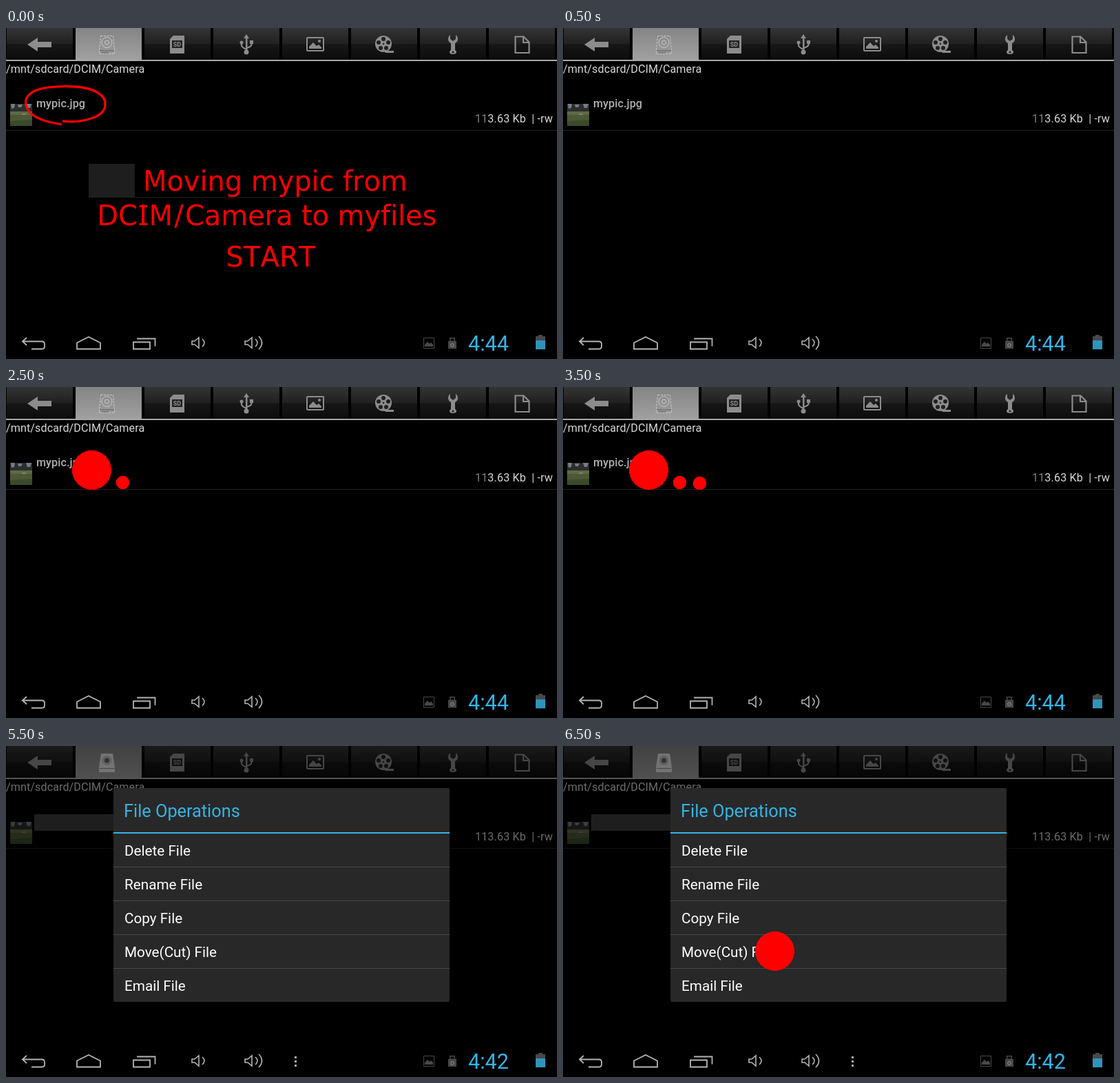
These frames come from a looping animation (800 by 480 pixels, 8000 ms). An HTML page:

```html
<!DOCTYPE html>
<html lang="en">
<head>
<meta charset="utf-8">
<title>Moving a file</title>
<style>
html, body { margin: 0; width: 100%; height: 100%; overflow: hidden; background: #000; }
svg { display: block; width: 800px; height: 480px; font-family: Roboto, sans-serif; }
text { white-space: pre; }

/* Hard cuts on one shared 8 s clock */
.cut { animation: 8s step-end infinite; }
.intro { animation-name: intro; }
.browse { animation-name: browse; }
.menu { animation-name: menu; }
.press { animation-name: press; }
.hold1 { animation-name: hold1; }
.hold2 { animation-name: hold2; }
.hold3 { animation-name: hold3; }
.pick { animation-name: pick; }
@keyframes intro { 0% { opacity: 1 } 6.25%, 100% { opacity: 0 } }
@keyframes browse { 0% { opacity: 1 } 68.75%, 100% { opacity: 0 } }
@keyframes menu { 0% { opacity: 0 } 68.75%, 100% { opacity: 1 } }
@keyframes press { 0% { opacity: 0 } 18.75%, 100% { opacity: 1 } }
@keyframes hold1 { 0% { opacity: 0 } 31.25%, 100% { opacity: 1 } }
@keyframes hold2 { 0% { opacity: 0 } 43.75%, 100% { opacity: 1 } }
@keyframes hold3 { 0% { opacity: 0 } 56.25%, 100% { opacity: 1 } }
@keyframes pick { 0% { opacity: 0 } 81.25%, 100% { opacity: 1 } }

.small { font-size: 16.1px; fill: #d8d8d8; letter-spacing: .1px; }
.caption { font: 40px "DejaVu Sans", Verdana, sans-serif; font-kerning: none; font-variant-ligatures: none; }
.red { fill: #f00; }
.touch { shape-rendering: crispEdges; }
.clock { font-size: 30.5px; fill: #33b5e5; }
.title { font-size: 25.3px; fill: #33b5e5; }
.item { font-size: 20.7px; fill: #fff; }
.line { fill: none; stroke: #b4b4b4; stroke-width: 1.8; }
</style>
</head>
<body>
<svg viewBox="0 0 800 480">
  <defs>
    <linearGradient id="tab" x2="0" y2="1">
      <stop offset="0" stop-color="#343434"/>
      <stop offset=".5" stop-color="#202020"/>
      <stop offset=".52" stop-color="#161616"/>
      <stop offset="1" stop-color="#0c0c0c"/>
    </linearGradient>
    <linearGradient id="active" x2="0" y2="1">
      <stop offset="0" stop-color="#848484"/>
      <stop offset="1" stop-color="#a0a0a0"/>
    </linearGradient>
    <path id="cell" d="M1 0h96v46h-96z"/>
  </defs>
  <rect width="800" height="480"/>

  <!-- Tab bar -->
  <g fill="url(#tab)">
    <use href="#cell"/>
    <use href="#cell" x="100" fill="url(#active)"/>
    <use href="#cell" x="200"/>
    <use href="#cell" x="300"/>
    <use href="#cell" x="400"/>
    <use href="#cell" x="500"/>
    <use href="#cell" x="600"/>
    <use href="#cell" x="700"/>
  </g>
  <path d="M0 46h800v2H0z" fill="#a8a8a8"/>
  <g fill="#8c8c8c">
    <path d="M31 24l15-10v6h20v8H46v6z"/>
    <path d="M243 11h16v26h-21V16z"/>
    <path d="M241 18h15v11h-15z" fill="#222"/>
    <text x="248.5" y="27" font-size="9" font-weight="700" text-anchor="middle">SD</text>
    <path d="M349 9l4 6h-8zM348 14h2.500v21H348z"/>
    <circle cx="349" cy="35" r="3.500"/>
    <circle cx="342" cy="21" r="2.500"/>
    <path d="M354 18h5v5h-5z"/>
    <path d="M342 21v4q0 3 7 6M356.500 21v3q0 3-7 5" fill="none" stroke="#8c8c8c" stroke-width="2.200"/>
    <rect x="437" y="14" width="24" height="19" rx="1" fill="none" stroke="#8c8c8c" stroke-width="2"/>
    <path d="M440 30v-3l6-6 5 5 3-2 4 4v2z"/>
    <circle cx="455" cy="19" r="2"/>
    <circle cx="548" cy="23" r="12"/>
    <path d="M549 33h14v3h-12z"/>
    <g fill="#202020">
      <circle cx="548" cy="16" r="3"/><circle cx="555" cy="21" r="3"/>
      <circle cx="552" cy="29" r="3"/><circle cx="544" cy="29" r="3"/>
      <circle cx="541" cy="21" r="3"/><circle cx="548" cy="23" r="1.200"/>
    </g>
    <path d="M645 10v6l4 3 4-3v-6q3 2 3 6 0 4-4 6v10q2 1 2 3 0 3-5 3t-5-3q0-2 2-3V22q-4-2-4-6 0-4 3-6z"/>
    <circle cx="649" cy="35" r="1.500" fill="#222"/>
    <path d="M739.500 12.500h12l8 8v15.500h-20zM751 13v8h8" fill="none" stroke="#8c8c8c" stroke-width="2.200"/>
  </g>

  <!-- File row -->
  <text class="small" x="0" y="65">/mnt/sdcard/DCIM/Camera</text>
  <g>
    <path d="M6 110h32v32H6z" fill="#4c5836"/>
    <path d="M6 110h32v11H6z" fill="#2c2e2c"/>
    <path d="M7 110h6l-1 6-4 1zM17 111h7l-2 4h-4zM29 110h8l-2 6h-4z" fill="#777b88"/>
    <path d="M6 121h32v5H6z" fill="#5f6845"/>
    <path d="M23 124h6v2h-6z" fill="#8b7f6b"/>
    <path d="M6 135l32-2v9H6z" fill="#3b4a2a"/>
  </g>
  <path d="M0 148h800v1H0z" fill="#242424"/>

  <!-- Browsing -->
  <g class="cut browse">
    <g fill="none" stroke="#d0d0d0" stroke-width=".9">
      <path d="M137.500 11.500h18l2 20v6h-22v-6z" stroke-dasharray="3 1.500"/>
      <circle cx="146.500" cy="21" r="7.500"/>
      <circle cx="146.500" cy="21" r="3"/>
      <path d="M136 33h21M139 36h10" stroke="#555"/>
    </g>
    <text class="small" x="44" y="115" style="fill:#b0b0b0;font-weight:500">mypic.jpg</text>
    <text class="small" x="794" y="137" text-anchor="end" style="letter-spacing:.15px"><tspan fill="#808080">11</tspan>3.63 Kb  | -rw</text>
    <g class="cut intro">
      <path d="M120 197h67v49h-67z" fill="#1e1e1e"/>
      <path d="M187 245h367v1H187z" fill="#1e1e1e"/>
      <path d="M81 140L62 136C46 132 36 126 31 117C25 106 30 97 42 91C56 85 80 84 100 85C128 87 145 97 144 111C144 121 136 127 124 131C112 135 98 137 82 135" fill="none" stroke="#f00" stroke-width="3.300"/>
      <g class="caption red">
        <text x="199" y="236" letter-spacing="-.08">Moving mypic from</text>
        <text x="132.300" y="286" dx="0 0 2.500 2.500 2.300 2.300" letter-spacing="-.1">DCIM/Camera to myfiles</text>
        <path d="M193.500 257h12v3h-12zM193.500 283h12v3h-12z"/>
        <text x="319.300" y="346" letter-spacing=".15">START</text>
      </g>
    </g>
    <g class="red touch">
      <circle class="cut press" cx="124.500" cy="120.500" r="28.500"/>
      <circle class="cut hold1" cx="169.500" cy="138.500" r="9.700"/>
      <circle class="cut hold2" cx="198.500" cy="139.500" r="9.700"/>
      <circle class="cut hold3" cx="229.500" cy="141.500" r="9.700"/>
    </g>
    <text class="clock" x="671" y="468">4:44</text>
  </g>

  <!-- File menu -->
  <g class="cut menu">
    <path d="M138 11h17l3 20v7h-23v-7z" fill="#e8e8e8"/>
    <circle cx="146.500" cy="21" r="7" fill="#c4c4c4"/>
    <circle cx="146.500" cy="21" r="3.500" fill="#666"/>
    <path d="M136 32h21v1h-21z" fill="#888"/>
    <text class="small" x="794" y="137" text-anchor="end" style="letter-spacing:.15px">113.63 Kb  | -rw</text>
    <path d="M0 0h800v430H0z" opacity=".5"/>
    <path d="M41 99h116v24H41z" fill="#1e1e1e"/>
    <rect x="156" y="61" width="488" height="310" rx="2" fill="#282828"/>
    <path d="M156 125h488v2H156z" fill="#33b5e5"/>
    <path d="M156 175.500h488m-488 49h488m-488 49h488m-488 49h488" stroke="#484848"/>
    <text class="title" x="171" y="103">File Operations</text>
    <g class="item">
      <text x="172" y="159">Delete File</text>
      <text x="172" y="208">Rename File</text>
      <text x="172" y="257">Copy File</text>
      <text x="172" y="306">Move(Cut) File</text>
      <text x="172" y="355">Email File</text>
    </g>
    <circle class="cut pick red touch" cx="307.500" cy="297.500" r="28.500"/>
    <path d="M419 450h3v3h-3zM419 456h3v3h-3zM419 462h3v3h-3z" fill="#aaa"/>
    <text class="clock" x="671" y="468">4:42</text>
  </g>

  <!-- System bar -->
  <g class="line">
    <path d="M30 449l-6 5.500 6 5.500M24 454.500h28q4 0 4 4v3q0 4-4 4H37"/>
    <path d="M103 465.500v-9l17-8.500 17 8.500v9z"/>
    <path d="M185 455.500h24v10h-24zM190 450.500h26.500v11"/>
    <path d="M270 454h4l6-5v15l-6-5h-4zM285 451q6 5.500 0 11" stroke-width="1.600"/>
    <path d="M347 454h4l6-5v15l-6-5h-4zM362 451q6 5.500 0 11M367 447q9 9.500 0 19" stroke-width="1.600"/>
  </g>
  <g fill="#484848">
    <path d="M606.500 449.500h15v15h-15z" fill="none" stroke="#484848"/>
    <path d="M608 462v-3l4-4 3 3 2-2 3 3v3z"/>
    <path fill-rule="evenodd" d="M644 449h8v5h2v11h-12v-11h2zM645.500 450.500v3h5v-3z"/>
    <circle cx="648" cy="460" r="2.300" fill="none" stroke="#999" stroke-width="1.300" stroke-dasharray="1.500 .7"/>
    <path d="M773 445h6v2h4v6h-14v-6h4z"/>
    <path d="M769 453h14v13h-14z" fill="#3093ba"/>
  </g>
</svg>
</body>
</html>
```
